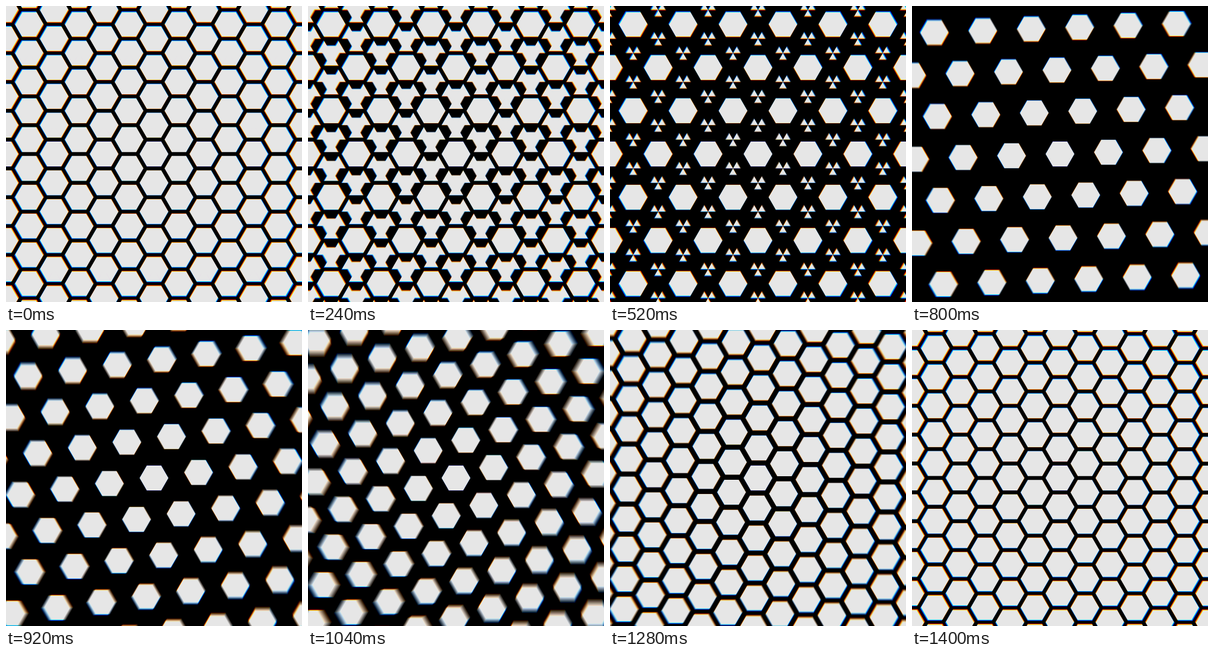
An HTML page with a canvas for the animation above (1430 ms loop, 500 by 500 pixels).

```html
<!DOCTYPE html>
<html lang="en">
<head>
<meta charset="utf-8">
<title>Hexagons</title>
<style>
  html, body { margin: 0; width: 100%; height: 100%; overflow: hidden; background: #000; }
  canvas { display: block; width: 500px; height: 500px; }
</style>
</head>
<body>
<canvas id="stage" width="500" height="500"></canvas>
<script>
const ctx = document.getElementById('stage').getContext('2d');

const LOOP = 1430;
const PITCH = 48.7;
const RADIUS = PITCH / 2;
const REACH = 12;
const SAMPLES = 5;
const SHUTTER = 0.5;
const FRINGE = 0.004;
const CHANNELS = [
  ['rgb(46,0,0)', 1 - FRINGE],
  ['rgb(0,46,0)', 1],
  ['rgb(0,0,46)', 1 + FRINGE],
];
const CORNERS = Array.from({ length: 7 }, (_, k) =>
  [RADIUS * Math.cos(k * Math.PI / 3), RADIUS * Math.sin(k * Math.PI / 3)]);

const lerp = (a, b, t) => a + (b - a) * t;

function ease(x, from, to, power) {
  const t = Math.min(1, Math.max(0, (x - from) / (to - from)));
  return t < 0.5 ? 0.5 * (2 * t) ** power : 1 - 0.5 * (2 - 2 * t) ** power;
}

// 17 steps of 40 ms, then 25 steps of 30 ms
const stepAt = ms => ms < 680 ? Math.floor(ms / 40) : 17 + Math.floor((ms - 680) / 30);

function addHex(path, x, y) {
  for (let k = 0; k < 6; k++) path.lineTo
    && path[k ? 'lineTo' : 'moveTo'](x + CORNERS[k][0], y + CORNERS[k][1]);
  path.closePath();
}

// Six wedges around the centre; even and odd ones have their own size
function addWedges(path, x, y, even, odd) {
  for (let k = 0; k < 6; k++) {
    const s = k % 2 ? odd : even;
    if (s < 0.002) continue;
    path.moveTo(x, y);
    path.lineTo(x + s * CORNERS[k][0], y + s * CORNERS[k][1]);
    path.lineTo(x + s * CORNERS[k + 1][0], y + s * CORNERS[k + 1][1]);
    path.closePath();
  }
}

function buildPath(step) {
  const path = new Path2D();
  const even = 1 - ease(step, 0, 14, 2);
  const odd = 1 - ease(step, 6.6, 20.2, 2);
  const turn = ease(step, 16.1, 42, 2.15);
  const gap = lerp(PITCH * Math.sqrt(3), PITCH, turn);
  const angle = -turn * Math.PI / 6;
  const ux = gap * Math.cos(angle), uy = gap * Math.sin(angle);
  const vx = gap * Math.cos(angle + Math.PI / 3), vy = gap * Math.sin(angle + Math.PI / 3);

  const place = (i, j, add) => {
    const x = i * ux + j * vx, y = i * uy + j * vy;
    if (Math.abs(x) < 285 && Math.abs(y) < 285) add(x, y);
  };
  const filler = (x, y) => even > 0.999
    ? addHex(path, x, y)
    : addWedges(path, x, y, even, odd);

  for (let i = -REACH; i <= REACH; i++) {
    for (let j = -REACH; j <= REACH; j++) {
      place(i, j, (x, y) => addHex(path, x, y));
      if (odd > 0.002) {
        place(i + 1 / 3, j + 1 / 3, filler);
        place(i + 2 / 3, j + 2 / 3, filler);
      }
    }
  }
  return path;
}

function draw(step) {
  ctx.setTransform(1, 0, 0, 1, 0, 0);
  ctx.globalCompositeOperation = 'source-over';
  ctx.fillStyle = '#000';
  ctx.fillRect(0, 0, 500, 500);
  ctx.globalCompositeOperation = 'lighter';
  for (let n = 0; n < SAMPLES; n++) {
    const path = buildPath(step + SHUTTER * n / (SAMPLES - 1));
    for (const [color, zoom] of CHANNELS) {
      ctx.setTransform(zoom, 0, 0, zoom, 250, 250);
      ctx.fillStyle = color;
      ctx.fill(path);
    }
  }
}

let shown = -1;
const start = performance.now();
function tick() {
  const step = stepAt((performance.now() - start) % LOOP);
  if (step !== shown) draw(shown = step);
  requestAnimationFrame(tick);
}
tick();
</script>
</body>
</html>
```
